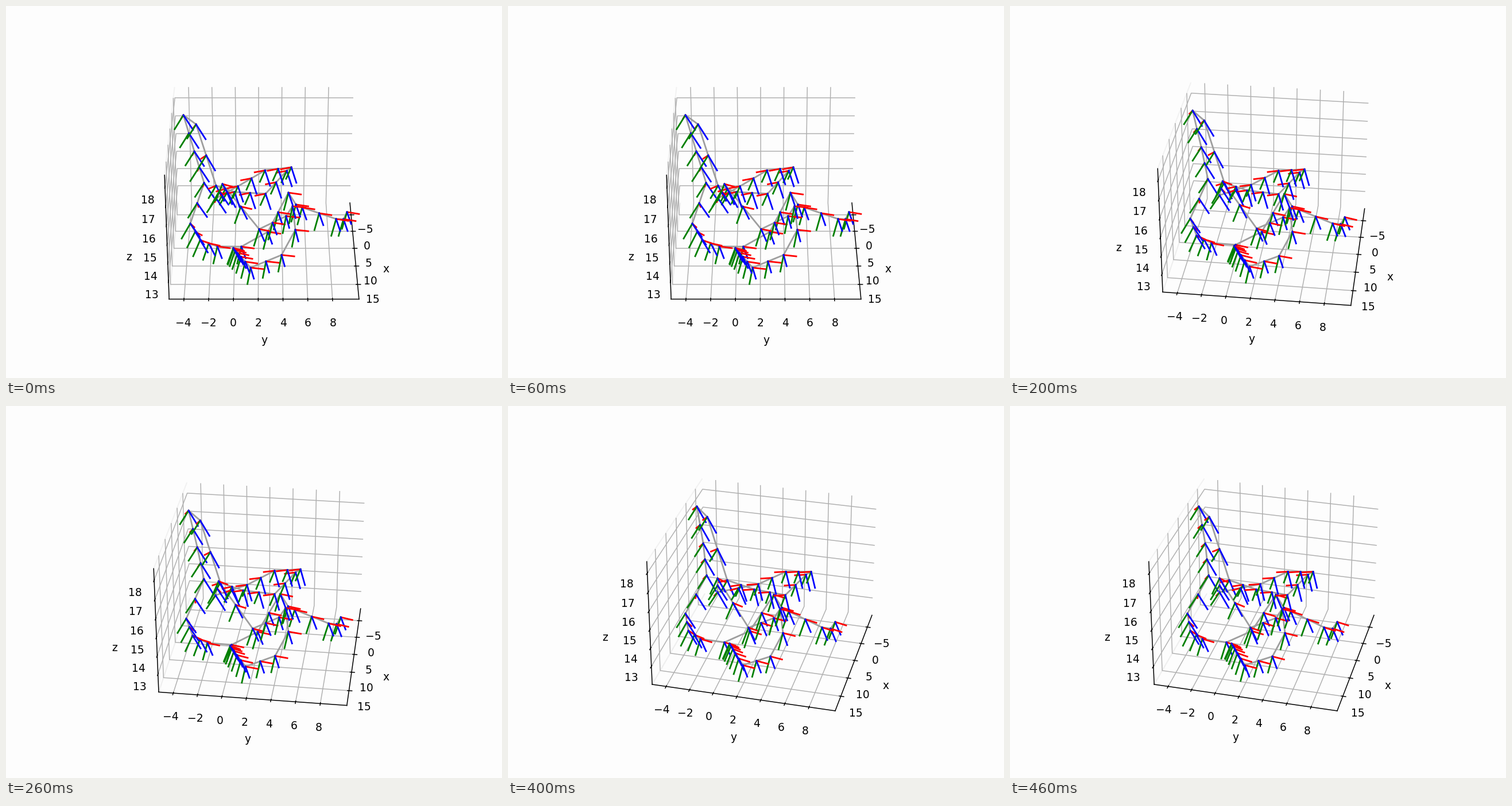
Write a matplotlib script that moves like this. It is 864 px wide and 648 px high and loops after 0.5 s.

```python
import numpy as np
import matplotlib.pyplot as plt
from matplotlib.animation import FuncAnimation

W, H, DPI = 864, 648, 135
FRAMES, INTERVAL = 5, 100
ELEV, STEP = 30, 3.6    # degrees; STEP is the turn per frame
START = 0.01            # keeps the left wall chosen when seen head-on
BG = "#fdfdfd"

ARROW = 1.1             # length of a camera axis
PITCH = np.radians(45)  # every camera looks down by this much
LONG = 2.29             # legs longer than this get a camera halfway
CLUSTER = 6             # cameras on the last leg, bunched towards its end

# Corners of the camera's path through the scene.
PATH = np.array([
    (12.04, 9.19, 15.39), (12.73, 8.90, 15.14), (13.42, 8.28, 15.28),
    (13.42, 5.53, 15.90), (13.82, 5.02, 16.13), (14.20, 4.41, 16.83),
    (16.58, 2.77, 15.20), (16.57, 0.65, 14.40), (17.16, -1.26, 14.53),
    (14.74, -2.69, 14.39), (11.03, -3.56, 14.57), (6.14, -2.48, 15.88),
    (2.60, -3.32, 16.96), (0.14, -4.22, 18.50), (1.14, -3.16, 18.17),
    (0.47, -1.61, 14.69), (-5.61, -0.12, 13.21), (-6.31, 2.60, 12.98),
    (-6.15, 4.45, 14.34), (-6.59, 4.85, 14.46), (-6.95, 2.55, 14.22),
    (-6.07, 0.18, 13.46), (6.51, -1.50, 15.10), (10.05, -0.90, 16.53),
    (12.60, 2.07, 14.57), (13.04, 4.25, 15.36), (12.92, 4.76, 15.87),
    (12.95, 5.01, 14.60), (12.58, 3.91, 13.14), (11.23, 1.35, 12.15),
    (9.21, -0.09, 12.85),
])
# Heading in degrees at some corners, blended in between.
TURNS = {0: 30, 8: 25, 11: 95, 14: 100, 16: 145, 21: 145,
         23: 45, 25: 20, 29: 20, 30: 40}


def stops():
    """Where cameras stand, counted in corners along the path."""
    legs = np.linalg.norm(np.diff(PATH, axis=0), axis=1)
    places = []
    for i, leg in enumerate(legs):
        places += [i, i + 0.5] if leg > LONG and i < len(legs) - 1 else [i]
    rest = np.linspace(1, 0, CLUSTER + 1)[1:]
    return np.append(places, len(legs) - rest ** 2)


def camera_axes(turn):
    """Right, down and forward vectors of a camera, with their colours."""
    s, c = np.sin(turn), np.cos(turn)
    right = np.array([s, c, 0])
    ahead = np.array([-c, s, 0])
    up = np.array([0, 0, 1])
    down = -np.sin(PITCH) * ahead - np.cos(PITCH) * up
    forward = np.cos(PITCH) * ahead - np.sin(PITCH) * up
    return zip("rgb", (right, down, forward))


fig = plt.figure(figsize=(W / DPI, H / DPI), dpi=DPI, facecolor=BG)
ax = fig.add_subplot(projection="3d")
ax.set_facecolor("none")
ax.set(xlim=(-8.75, 18.87), ylim=(-5.2, 10.14), zlim=(11.99, 18.59),
       xticks=range(-5, 16, 5), yticks=range(-4, 9, 2), zticks=range(13, 19),
       xlabel="x", ylabel="y", zlabel="z")
for axis in (ax.xaxis, ax.yaxis, ax.zaxis):
    axis.pane.fill = False
ax.xaxis.pane.set_edgecolor("none")

where = stops()
corners = np.arange(len(PATH))
points = np.column_stack([np.interp(where, corners, c) for c in PATH.T])
turns = np.radians(np.interp(where, list(TURNS), list(TURNS.values())))

ax.plot(*points.T, color="0.62", lw=1.5)
for point, turn in zip(points, turns):
    for color, axis in camera_axes(turn):
        ax.plot(*np.transpose([point, point + ARROW * axis]),
                color=color, lw=1.5)


def update(frame):
    ax.view_init(ELEV, START + STEP * frame)
    return ()


anim = FuncAnimation(fig, update, frames=FRAMES, init_func=lambda: (),
                     interval=INTERVAL, repeat=True, repeat_delay=0)
plt.show()
```
